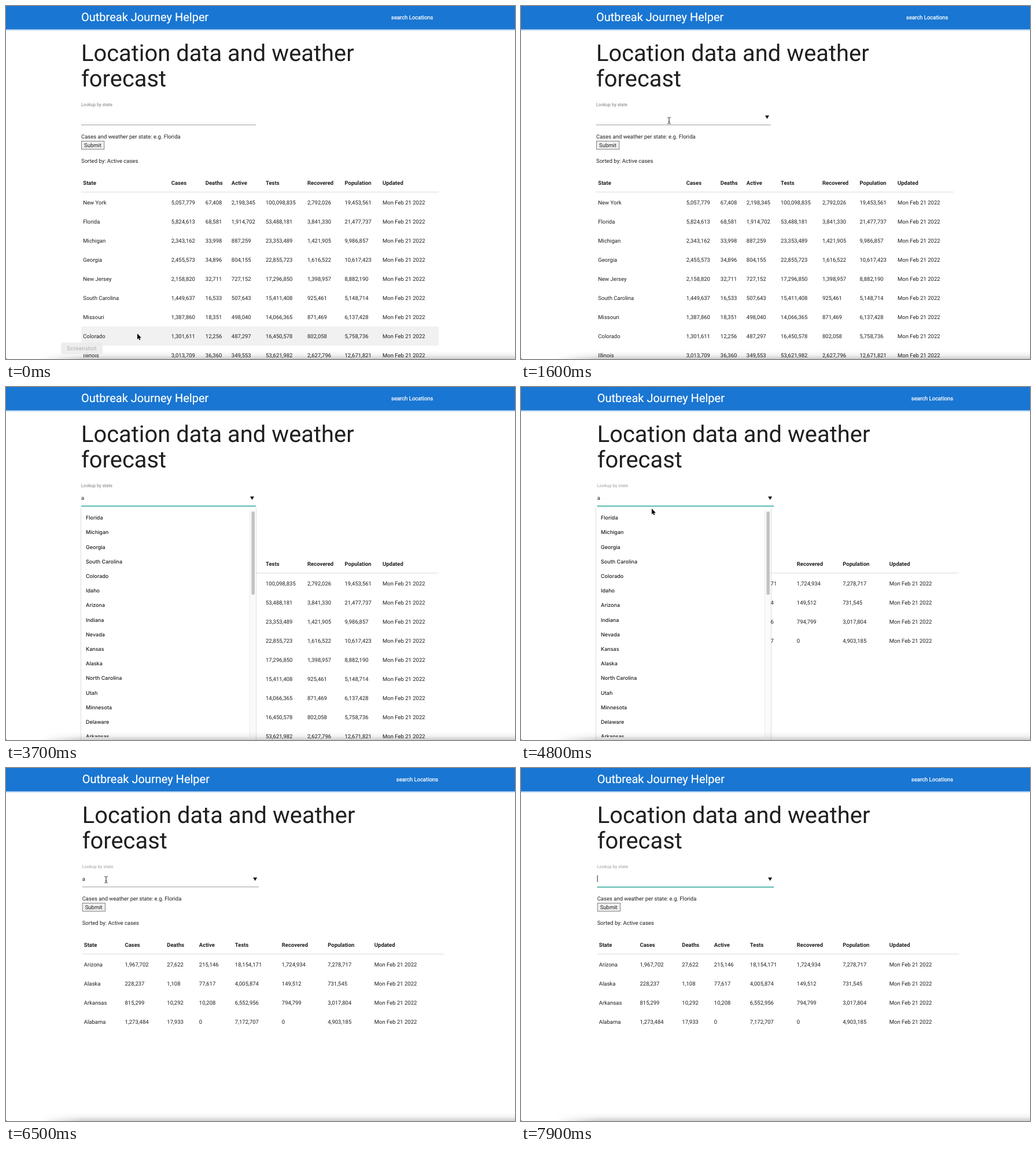
Animation of 880 by 610 pixels, one loop 8 s. Source, as an HTML page:

```html
<!DOCTYPE html>
<html lang="en">
<head>
<meta charset="utf-8">
<title>Location data and weather forecast</title>
<style>
html, body { margin: 0; width: 100%; height: 100%; overflow: hidden; background: #fff; }
svg { display: block; width: 880px; height: 610px; }
text { font: 9.5px Roboto, sans-serif; fill: #1f1f1f; white-space: pre; text-rendering: geometricPrecision; }
.logo { font-size: 20px; fill: #fff; stroke: #fff; stroke-width: .2px; }
.nav { fill: #fff; stroke: #fff; stroke-width: .25px; }
.h1 { font-size: 39.9px; }
.label { font-size: 7.6px; fill: #9e9e9e; }
.strong { stroke: #9e9e9e; stroke-width: .25px; }
.th { font-weight: 700; }
.item { font: 500 9px Inter, sans-serif; fill: #1c1c1c; }
.tip { font: 9.6px Inter, sans-serif; fill: #b0b0b0; }
</style>
</head>
<body>
<svg id="stage" viewBox="0 0 880 610">
  <defs>
    <linearGradient id="fall" x1="0" y1="0" x2="0" y2="1">
      <stop offset="0" stop-color="#000" stop-opacity="0"/>
      <stop offset=".5" stop-color="#000" stop-opacity=".05"/>
      <stop offset="1" stop-color="#000" stop-opacity=".19"/>
    </linearGradient>
    <linearGradient id="side">
      <stop offset="0" stop-color="#000"/>
      <stop offset=".09" stop-color="#fff"/>
    </linearGradient>
    <linearGradient id="navShade" x1="0" y1="0" x2="0" y2="1">
      <stop offset="0" stop-color="#1976d2" stop-opacity=".6"/>
      <stop offset="1" stop-color="#1976d2" stop-opacity="0"/>
    </linearGradient>
    <mask id="edge"><rect x="60" y="590" width="820" height="20" fill="url(#side)"/></mask>
    <clipPath id="listClip"><rect x="0" y="207" width="880" height="398"/></clipPath>
  </defs>
</svg>
<script>
const LOOP = 8000, STEP = 100;
const ROW_TOP = 321.9, ROW_H = 33.1;
const stage = document.getElementById('stage');

function add(parent, tag, attrs = {}, content) {
  const el = document.createElementNS('http://www.w3.org/2000/svg', tag);
  for (const k in attrs) el.setAttribute(k, attrs[k]);
  if (content !== undefined) el.textContent = content;
  parent.appendChild(el);
  return el;
}
const group = (parent = stage, attrs) => add(parent, 'g', attrs);
const rect = (p, x, y, width, height, fill, more) => add(p, 'rect', { x, y, width, height, fill, ...more });
const text = (p, x, y, s, cls = '') => add(p, 'text', { x, y, class: cls }, s);
const show = (el, on) => el.setAttribute('display', on ? 'inline' : 'none');
const place = (el, x, y) => el.setAttribute('transform', `translate(${x} ${y})`);
const clamp = v => Math.max(0, Math.min(1, v));
const ease = v => v * v * (3 - 2 * v);
const mix = (a, b, p) => a + (b - a) * p;

const HEADS = ['State', 'Cases', 'Deaths', 'Active', 'Tests', 'Recovered', 'Population', 'Updated'];
const DATE = 'Mon Feb 21 2022';

const allRows = `New York|5,057,779|67,408|2,198,345|100,098,835|2,792,026|19,453,561
Florida|5,824,613|68,581|1,914,702|53,488,181|3,841,330|21,477,737
Michigan|2,343,162|33,998|887,259|23,353,489|1,421,905|9,986,857
Georgia|2,455,573|34,896|804,155|22,855,723|1,616,522|10,617,423
New Jersey|2,158,820|32,711|727,152|17,296,850|1,398,957|8,882,190
South Carolina|1,449,637|16,533|507,643|15,411,408|925,461|5,148,714
Missouri|1,387,860|18,351|498,040|14,066,365|871,469|6,137,428
Colorado|1,301,611|12,256|487,297|16,450,578|802,058|5,758,736
Illinois|3,013,709|36,360|349,553|53,621,982|2,627,796|12,671,821`;

const foundRows = `Arizona|1,967,702|27,622|215,146|18,154,171|1,724,934|7,278,717
Alaska|228,237|1,108|77,617|4,005,874|149,512|731,545
Arkansas|815,299|10,292|10,208|6,552,956|794,799|3,017,804
Alabama|1,273,484|17,933|0|7,172,707|0|4,903,185`;

const allStates = ('New York,Florida,Michigan,Georgia,New Jersey,South Carolina,Missouri,Colorado,' +
  'Illinois,Idaho,Oregon,Arizona,Puerto Rico,Indiana,Nevada,Kansas').split(',');
const aStates = ('Florida,Michigan,Georgia,South Carolina,Colorado,Idaho,Arizona,Indiana,' +
  'Nevada,Kansas,Alaska,North Carolina,Utah,Minnesota,Delaware,Arkansas').split(',');

function buildPage({ left, right, nav, field, cols, rows, strong }) {
  const g = group();
  rect(g, 0, 0, 880, 610, '#fff');
  rect(g, 0, 40, 880, 3, 'url(#navShade)');
  rect(g, 0, 0, 880, 40, '#1976d2');
  text(g, left, 26, 'Outbreak Journey Helper', 'logo');
  text(g, nav, 22.5, 'search Locations', 'nav');
  text(g, left, 95, 'Location data and weather', 'h1');
  text(g, left, 138.8, 'forecast', 'h1');
  text(g, left, 173, 'Lookup by state', strong ? 'label strong' : 'label');
  text(g, left, 229, 'Cases and weather per state: e.g. Florida');
  rect(g, left + .5, 233.5, 39.3, 14, '#efefef', { stroke: '#767676', 'stroke-width': .9 });
  text(g, left + 5, 243.8, 'Submit');
  text(g, left, 271.2, 'Sorted by: Active cases');
  const hover = rect(g, left, 0, right - left, ROW_H, '#f1f1f1');
  rect(g, left, 321, right - left, 1, '#dcdcdc');
  HEADS.forEach((h, i) => text(g, cols[i], 309, h, 'th'));
  rows.split('\n').forEach((row, r) => {
    [...row.split('|'), DATE].forEach((cell, i) => text(g, cols[i], 342.5 + r * ROW_H, cell));
  });
  const line = rect(g, left, 205, field, 1, '#9e9e9e');
  const glow = rect(g, left, 205, field, 1.5, '#26a69a');
  const value = text(g, left, 195, 'a');
  const tx = left + field - 10;
  const arrow = add(g, 'path', { d: `M${tx} 189.3h7l-3.5 5.6z`, fill: '#111' });
  const caret = rect(g, 0, 185.5, 1, 11.5, '#222');
  return { g, left, hover, line, glow, value, arrow, caret };
}

function buildList(x, w, names, thumb) {
  const g = group();
  rect(g, x - 1.2, 208, w + 2.4, 402, '#000', { opacity: .07 });
  rect(g, x - .6, 207.5, w + 1.2, 402.5, '#000', { opacity: .1 });
  rect(g, x, 207, w, 403, '#fff');
  rect(g, x + w - 11, 212, 11, 393, '#fafafa');
  rect(g, x + w - 11, 212, .8, 393, '#e9e9e9');
  rect(g, x + w - 7.6, 215, 5.6, thumb, '#c2c2c2', { rx: 2.8 });
  const items = group(g, { 'clip-path': 'url(#listClip)' });
  names.forEach((n, i) => text(items, x + 8, 229.2 + i * 25.2, n, 'item'));
  return g;
}

const before = buildPage({
  left: 130, right: 748, nav: 666, field: 302, rows: allRows, strong: true,
  cols: [133.3, 285.8, 344.8, 389.8, 449, 521, 585.5, 651]
});
const after = buildPage({
  left: 131.7, right: 757, nav: 674.8, field: 305.5, rows: foundRows, strong: false,
  cols: [134.8, 205.5, 278.3, 333.8, 395.8, 476.8, 556.2, 636.8]
});

// Option lists: [element, opens, closes]
const lists = [
  [buildList(130, 302, allStates, 101), 1800, 3200],
  [buildList(130, 302, aStates, 144), 3200, 5400],
  [buildList(132, 305, aStates, 144), 6700, 7100],
  [buildList(132, 305, allStates, 101), 7100, 7400]
];

rect(stage, 60, 596, 820, 14, 'url(#fall)', { mask: 'url(#edge)' });
add(stage, 'path', { d: 'M0 608.4L1.6 610H0z', fill: '#333' });

const tip = group();
rect(tip, 95, 581.5, 72, 20.5, '#ebebeb', { rx: 4, opacity: .88 });
text(tip, 105, 594.8, 'Screenshot', 'tip');

const pointer = group();
add(pointer, 'path', {
  d: 'M0 0V10L2.2 8L3.8 11.6L5.4 10.9L3.9 7.4H7z',
  fill: '#000', stroke: '#fff', 'stroke-width': 1, 'paint-order': 'stroke'
});
const beam = group();
const beamPath = 'M-2.6 -5.5Q-.3 -5.5 0 -4.2Q.3 -5.5 2.6 -5.5M0 -4.5V4.5M-2.6 5.5Q-.3 5.5 0 4.2Q.3 5.5 2.6 5.5M-1.3 1.8H1.3';
add(beam, 'path', { d: beamPath, fill: 'none', stroke: '#fff', 'stroke-width': 2 });
add(beam, 'path', { d: beamPath, fill: 'none', stroke: '#222', 'stroke-width': 1 });

// Mouse legs: [start, end, x0, y0, x1, y1]; hidden between legs where a gap exists
const legs = [
  [0, 700, 227, 566, 227, 566],
  [700, 1600, 227, 566, 256, 198],
  [1600, 3200, 256, 198, 256, 198],
  [4600, 4700, 257, 208, 257, 208],
  [4700, 4800, 257, 208, 226, 210],
  [4800, 5400, 226, 210, 84, 211],
  [5400, 6100, 84, 211, 84, 211],
  [6100, 6300, 84, 211, 173, 193],
  [6300, 7100, 173, 193, 173, 193]
];

function mouseAt(t) {
  const leg = legs.find(([a, b]) => t >= a && t < b);
  if (!leg) return null;
  const [a, b, x0, y0, x1, y1] = leg;
  const p = ease((t - a) / (b - a));
  return { x: mix(x0, x1, p), y: mix(y0, y1, p) };
}

const inside = (t, spans) => spans.some(([a, b]) => t >= a && t < b);
const CARET = [[1700, 2200], [2500, 3700], [4200, 4800], [6600, LOOP]];

function focusAt(t) {
  if (t < 5400) return clamp((t - 1600) / 300);
  if (t < 6600) return clamp(1 - (t - 5300) / 300);
  return clamp((t - 6500) / 300);
}

function render(t) {
  const page = t < 3900 ? before : after;
  show(before.g, page === before);
  show(after.g, page === after);

  const mouse = mouseAt(t);
  const typed = t >= 3200 && t < 7100;
  const focus = focusAt(t);
  const overField = !!mouse && mouse.x > page.left && mouse.y > 183 && mouse.y < 207;

  page.glow.setAttribute('opacity', focus);
  show(page.value, typed);
  show(page.caret, inside(t, CARET));
  page.caret.setAttribute('x', page.left + (typed ? 5.2 : 0));
  const focused = inside(t, [[1700, 5400], [6600, LOOP]]);
  show(page.arrow, overField || focused);

  const row = mouse ? Math.floor((mouse.y - ROW_TOP) / ROW_H) : -1;
  show(page.hover, page === before && row >= 0);
  page.hover.setAttribute('y', ROW_TOP + row * ROW_H + .4);

  for (const [el, a, b] of lists) show(el, t >= a && t < b);

  tip.setAttribute('opacity', clamp(1 - t / 400));

  show(pointer, mouse && !overField);
  show(beam, overField);
  if (mouse) {
    place(pointer, mouse.x, mouse.y);
    place(beam, mouse.x, mouse.y);
  }
}

const start = performance.now();
function tick(now) {
  const t = Math.max(0, now - start) % LOOP;
  render(Math.floor(t / STEP) * STEP);
  requestAnimationFrame(tick);
}
render(0);
requestAnimationFrame(tick);
</script>
</body>
</html>
```
